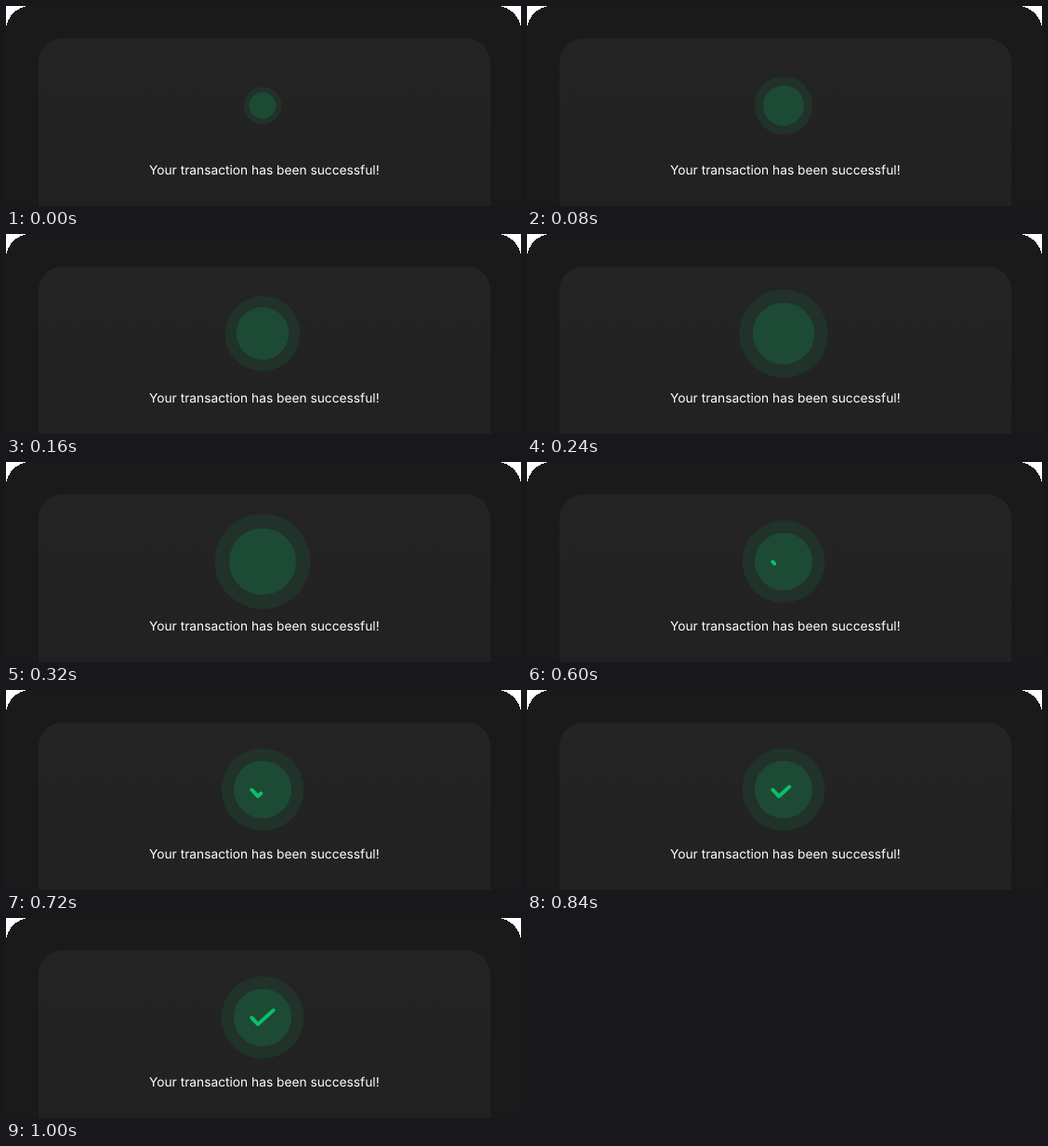
An HTML page that plays this animation: 554 px wide and 216 px high, repeating every 2 s.

```html
<!DOCTYPE html>
<html lang="en">
<head>
<meta charset="utf-8">
<title>Transaction successful</title>
<style>
  html, body { margin: 0; width: 100%; height: 100%; overflow: hidden; background: #fff; }
  svg { display: block; width: 100%; height: 100%; }
  text { font: 400 13.76px Inter, sans-serif; fill: #fff; text-rendering: geometricPrecision; }
</style>
</head>
<body>
<svg viewBox="0 0 554 216">
  <defs>
    <linearGradient id="panel" x1="0" y1="0" x2="0" y2="1">
      <stop offset="0" stop-color="#242424"/>
      <stop offset="1" stop-color="#212121"/>
    </linearGradient>
  </defs>
  <rect width="554" height="260" rx="26.5" fill="#1a1a1a" shape-rendering="crispEdges"/>
  <rect x="35" y="35" width="486" height="220" rx="26" fill="url(#panel)"/>
  <g id="badge">
    <circle r="44.4" fill="#203229"/>
    <circle r="31.1" fill="#1d4a34"/>
  </g>
  <path id="check" d="M264.3 107.7L271 114.8L287.6 99.6" fill="none" stroke="#0abf6b"
    stroke-width="3.9" stroke-linecap="round" stroke-linejoin="round"/>
  <text x="277.8" y="182" text-anchor="middle">Your transaction has been successful!</text>
</svg>
<script>
  const LOOP = 2000, STEP = 40;
  const START = 0.458, PEAK = 1.158;
  const badge = document.getElementById('badge');
  const check = document.getElementById('check');
  const length = check.getTotalLength();

  const clamp = x => Math.min(1, Math.max(0, x));
  const progress = (t, from, to) => clamp((t - from) / (to - from));
  const mix = (a, b, k) => a + (b - a) * k;

  function bezier(x1, y1, x2, y2) {
    const at = (a, b, u) => 3 * a * u * (1 - u) ** 2 + 3 * b * u * u * (1 - u) + u ** 3;
    return x => {
      let lo = 0, hi = 1;
      for (let i = 0; i < 24; i++) {
        const mid = (lo + hi) / 2;
        if (at(x1, x2, mid) < x) lo = mid; else hi = mid;
      }
      return at(y1, y2, hi);
    };
  }

  const settle = bezier(0.25, 0.1, 0.25, 1);
  const draw = bezier(0.25, 0.2, 0.6, 0.94);

  function scaleAt(t) {
    if (t < 320) return mix(START, PEAK, 1 - (1 - t / 320) ** 1.515);
    return mix(PEAK, 1, settle(progress(t, 320, 560)));
  }

  function render(time) {
    const t = Math.floor((time % LOOP) / STEP) * STEP;
    badge.setAttribute('transform', `translate(276 107.5) scale(${scaleAt(t)})`);

    const drawn = length * draw(progress(t, 560, 1000));
    check.setAttribute('visibility', t > 560 ? 'visible' : 'hidden');
    check.setAttribute('stroke-dasharray', t < 1000 ? `${drawn} ${length * 2}` : 'none');
  }

  const begin = performance.now();
  function tick() {
    render(performance.now() - begin);
    requestAnimationFrame(tick);
  }
  tick();
</script>
</body>
</html>
```
